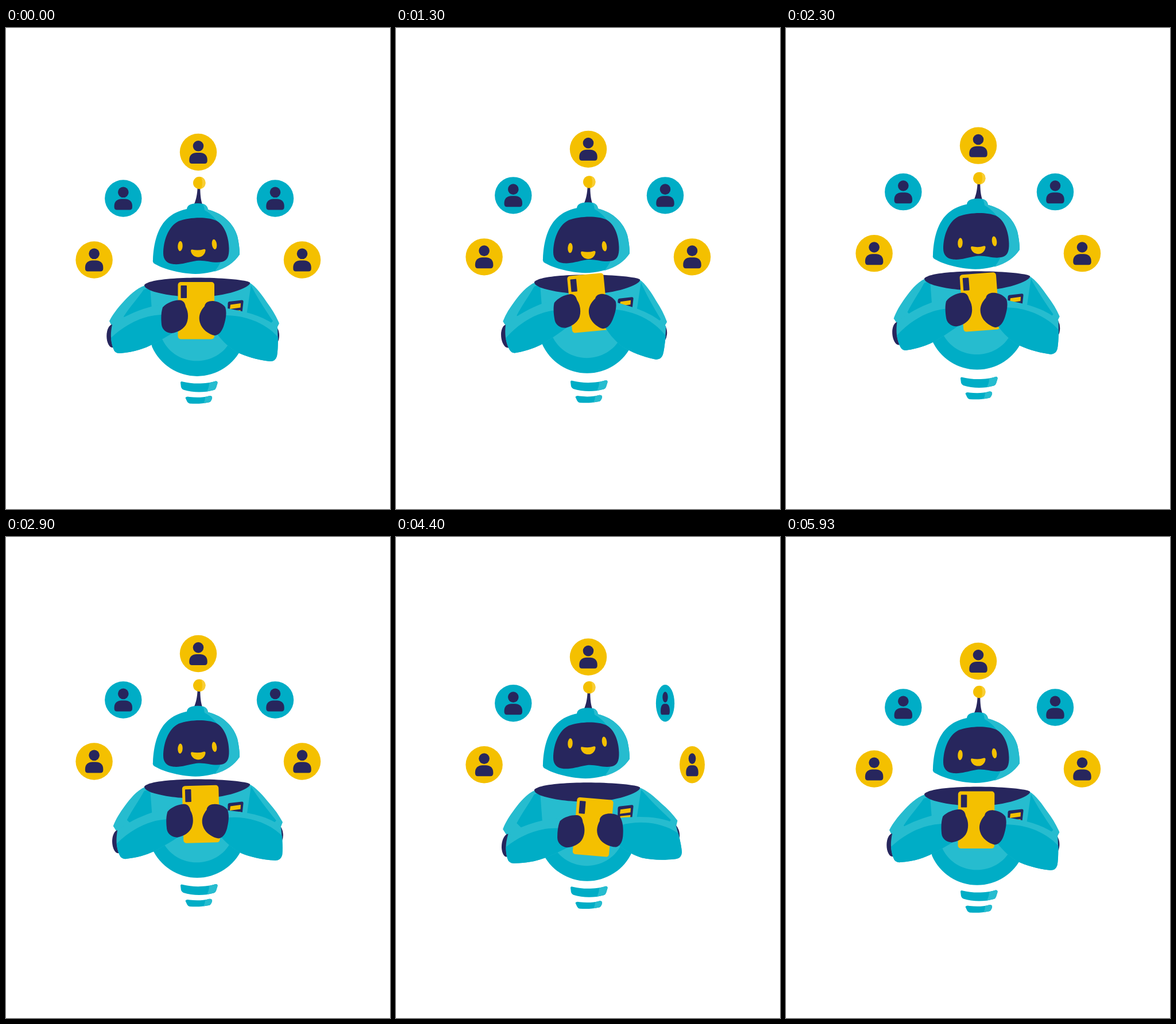
An HTML page for the animation above (6.01 s loop, 669 by 837 pixels).

```html
<!DOCTYPE html>
<html lang="en">
<head>
<meta charset="utf-8">
<title>Robot with phone</title>
<style>
  html, body { margin: 0; width: 100%; height: 100%; overflow: hidden; background: #fff; }
  svg { display: block; width: 100vw; height: 100vh; }
  .teal { fill: #00adc6; }
  .light { fill: #26bccf; }
  .navy { fill: #27265d; }
  .gold { fill: #f4c000; }
  .pale { fill: #f9ce33; }
</style>
</head>
<body>
<svg viewBox="0 0 669 837">
  <defs>
    <g id="person" class="navy">
      <circle cy="-10.7" r="9.3"/>
      <path d="M-11 20Q-15.7 20 -15.7 15V13C-15.7 5 -10 1 -3 1H3C10 1 15.7 5 15.7 13V15Q15.7 20 11 20Z"/>
    </g>
  </defs>

  <g id="icons"></g>

  <g id="tail">
    <path class="teal" d="M304 617Q304.5 614 308 615.5C325 620 350 619.5 365 614.5Q369 614 368.5 618L366 626Q365 629 362 630C345 635 325 634.5 309 629.5Q306 628 305 625Z"/>
    <path class="light" d="M354 617.6L365 614.5Q369 614 368.5 618L366 626Q365 629 362 630L350 632.5Q354 625 354 617.6Z"/>
    <path class="teal" d="M312.5 643.5Q314 640.5 320 642C332 643.5 344 643 354 640.2Q360 639.5 359 645L357 649Q356 651 353 651.5C342 654 332 654 320 653.5Q317 653 315.5 650Z"/>
    <path class="light" d="M347 642L354 640.2Q360 639.5 359 645L357 649Q356 651 353 651.5L344 653Q347 648 347 642Z"/>
  </g>

  <g id="body">
    <path class="teal" d="M241 447L425 443C432 480 425 520 411.5 555A86 86 0 0 1 254.5 555C245 520 241 480 241 447Z"/>

    <g id="leftUpper">
      <path class="light" d="M242 448C227 453 214 466 204 477C194 488 186 498 180 510L185 520L192 530L256 520L252 452Z"/>
      <path class="teal" d="M240 455C230 470 216 485 205 502L220 520L258 510L252 452Z"/>
    </g>
    <g id="rightUpper">
      <path class="light" d="M424 443C435 449 447 466 455 478C464 490 471 502 476 514L471 524L440 535L405 530L420 452Z"/>
      <path class="teal" d="M427 448C436 466 450 488 465 510L445 530L405 530L420 452Z"/>
    </g>

    <path class="light" d="M251 450L254 490C255 515 262 532 272 541C295 591.5 368 592 392 543C408 530 418 510 421 487L427 446Z"/>
    <path class="navy" d="M241 447C250 437 300 434.4 340 434.5C380 435 420 438.5 425 443C427 451 385 468 333 468C290 468 240 459 241 447Z"/>

    <path class="navy" d="M389 476L411 473.5Q414 473.500 413.500 477L411 499L386 501L386.500 479Q386.500 476.500 389 476Z"/>
    <path class="gold" d="M391 481.500L409 479L408.500 486.500L390 489Z"/>
    <path class="gold" d="M390.500 493L408.500 491L408 497.500L390 499Z"/>

    <g id="leftArm">
      <ellipse class="navy" cx="185.500" cy="536" rx="10.200" ry="20"/>
      <rect class="gold" x="299.500" y="442" width="63.500" height="99.500" rx="5"/>
      <rect class="navy" x="304.500" y="448" width="10.500" height="22" rx="1"/>
      <path class="light" d="M275 480C240 486 207 500 185 516C181 535 183 548 187 558Q190 567 199 566C225 564 244 557 258 549C270 543 280 537 290 531V480Z"/>
      <path class="teal" d="M275 499C240 499 209 515 183 539Q184 550 187 558Q190 567 199 566C225 564 244 557 258 549C270 543 280 537 290 531V499Z"/>
      <path class="navy" d="M273 486C280 478 292 474 301 473.500C309 473 312 479 313 485C318 494 318 505 315 513C311 524 298 530 289 531C280 531 272 525 271 516C270 506 270 495 273 486Z"/>
    </g>

    <g id="rightArm">
      <ellipse class="navy" cx="466.500" cy="535" rx="9.500" ry="17"/>
      <path class="light" d="M380 487C410 492 448 499 473 521C474 542 474 560 472 571Q469 581 459 580C435 577 417 571 402 564C390 557 378 546 368 533Z"/>
      <path class="teal" d="M380 500C415 499 452 513 474 538Q474 560 472 571Q469 581 459 580C435 577 417 571 402 564C390 557 378 546 368 533Z"/>
      <path class="navy" d="M346 484C347 477 354 474.500 361 475C370 476 378 480 382 486C385 495 383 506 380 516C377 527 371 535 363 535C353 533 341 524 338 513C335 504 337 494 346 484Z"/>
    </g>
  </g>

  <g id="head">
    <path class="navy" d="M333.700 277H338.300C338.300 290 339.500 299 341.800 306H328C331 299 333.300 290 333.700 277Z"/>
    <circle class="gold" cx="336.700" cy="269.500" r="10.700"/>
    <path class="pale" d="M340 259.300A10.700 10.700 0 0 1 340 279.700Q344 269.500 340 259.300Z"/>
    <path class="teal" d="M256 403C257 375 264 345 284 329C295 320 306 317 315 315C316 308 322 305.300 334 305C346 305 351 309 352 316C380 323 397 342 403 362C406 375 407 385 407 394C395 412 370 427 330 428C300 427 270 418 257 409Q255 406 256 403Z"/>
    <path class="light" d="M343 305.700Q351 308 352 316C380 323 397 342 403 362C406 375 407 385 407 394C398 408 384 418 363 424C393 390 383 337 346 317Q345 310 343 305.700Z"/>
    <path class="navy" d="M301 336C320 329 350 328 366 335C380 342 388 362 388.500 383C389 398 385 405 376 407C360 410 348 403 332 405C315 408 305 412 292 411C280 410 274 403 274 392C274 372 282 345 301 336Z"/>
    <g id="face" class="gold">
      <ellipse id="leftEye" cx="303.500" cy="379.500" rx="4.200" ry="8.800"/>
      <ellipse id="rightEye" cx="363" cy="376.500" rx="4.200" ry="8.800"/>
      <path d="M324 385.500Q335 388 345 384.700Q348 384.500 347.500 387.500C346.500 394.500 341 398.700 335 398.700C328 398.700 323 394 322 388Q322 385 324 385.500Z"/>
    </g>
  </g>
</svg>

<script>
  const LOOP = 6010, PERIOD = 6000;
  const el = id => document.getElementById(id);
  const put = (id, value) => el(id).setAttribute('transform', value);

  const KNOTS = [0, 850, 1700, 2900, 4400, 5150];

  // Smooth periodic curve through one value per knot
  function curve(values) {
    const n = KNOTS.length;
    const time = i => KNOTS[(i + n) % n] + Math.floor(i / n) * PERIOD;
    const value = i => values[(i + n) % n];
    const slope = i => (value(i + 1) - value(i - 1)) / (time(i + 1) - time(i - 1));
    return t => {
      let i = n - 1;
      while (KNOTS[i] > t) i--;
      const span = time(i + 1) - time(i), u = (t - time(i)) / span, v = 1 - u;
      return value(i) * v * v * (1 + 2 * u) + value(i + 1) * u * u * (3 - 2 * u)
        + span * u * v * (slope(i) * v - slope(i + 1) * u);
    };
  }

  const ease = p => (1 - Math.cos(Math.PI * Math.min(1, Math.max(0, p)))) / 2;
  const lift = (t, start, peak, end) =>
    t < peak ? ease((t - start) / (peak - start)) : ease((end - t) / (end - peak));

  const left = {
    x: curve([0, 2, 4, 8.5, 12, 7]),
    y: curve([0, -5.2, -8.7, 3.5, 20.2, 12]),
    turn: curve([0, -3.8, -6, -1.5, 4.8, 2.8]),
    upper: curve([0, -3.4, -7, -6, -5.5, -2.6])
  };
  const right = {
    x: curve([0, -0.5, -0.5, 5, 13.5, 7.5]),
    y: curve([0, -4.7, -7.2, 2.7, 13.2, 8.5]),
    turn: curve([0, 3.6, 5, -3.9, -13.8, -8.2]),
    upper: curve([0, 1.9, 3.1, -5.1, -13, -8.2])
  };
  const faceY = curve([0, 4.6, 4.3, 0, -12.5, 0.4]);

  const FLIP = 700;
  const icons = [
    { x: 153.6, y: 403.5, tone: 'gold' },
    { x: 204.3, y: 296.5, tone: 'teal' },
    { x: 335, y: 216, tone: 'gold', flip: 1540 },
    { x: 469, y: 296.5, tone: 'teal', flip: 3933 },
    { x: 516, y: 403.5, tone: 'gold', flip: 4217 }
  ];
  el('icons').innerHTML = icons.map((c, i) =>
    `<g id="icon${i}"><circle class="${c.tone}" r="32.2"/><use href="#person"/></g>`).join('');

  function flipScale(t, start) {
    const p = (t - start) / FLIP;
    return p > 0 && p < 1 ? Math.max(0.02, Math.abs(Math.cos(Math.PI * p))) : 1;
  }

  function moveArm(id, arm, t, cx, cy) {
    put(id, `translate(${arm.x(t)} ${arm.y(t)}) rotate(${arm.turn(t)} ${cx} ${cy})`);
  }

  function blink(id, cx, cy, tilt, open) {
    put(id, `translate(${cx} ${cy}) rotate(${tilt}) scale(1 ${open}) translate(${-cx} ${-cy})`);
  }

  function draw(t) {
    const bob = -13 * lift(t, 0, 3000, 6000);
    icons.forEach((c, i) =>
      put('icon' + i, `translate(${c.x} ${c.y + bob}) scale(${flipScale(t, c.flip)} 1)`));

    put('body', `translate(0 ${bob})`);
    put('leftUpper', `rotate(${left.upper(t)} 241 449)`);
    put('rightUpper', `rotate(${right.upper(t)} 425 444)`);
    moveArm('leftArm', left, t, 331.5, 491.5);
    moveArm('rightArm', right, t, 360, 505);

    put('tail', `translate(0 ${-11 * lift(t, 700, 3265, 5930)})`);
    put('head', `translate(0 ${-12 * lift(t, 650, 3330, 6000)})`);
    put('face', `translate(0 ${faceY(t)})`);

    const open = Math.min(1, 0.1 + Math.abs(t - 5260) / 210);
    blink('leftEye', 303.5, 379.5, 3, open);
    blink('rightEye', 363, 376.5, -8, open);
  }

  // Poses advance 50 ms each, held alternately for 30 and 70 ms
  function tick() {
    const t = performance.now() % LOOP;
    const step = 2 * Math.floor(t / 100) + (t % 100 >= 30 ? 1 : 0);
    draw(Math.min(step, 119) * 50);
    requestAnimationFrame(tick);
  }
  tick();
</script>
</body>
</html>
```
